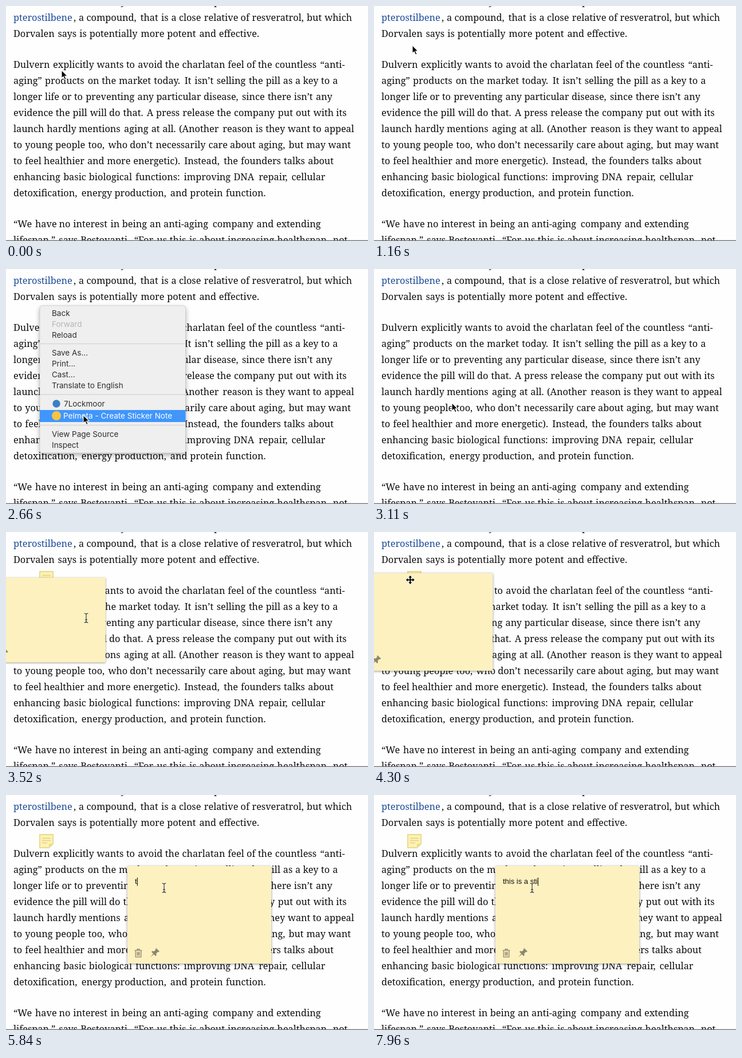
An HTML page that plays this animation: 632x410 px, repeating every 8 s.

```html
<!DOCTYPE html>
<html lang="en">
<head>
<meta charset="utf-8">
<title>Sticker note</title>
<style>
  html, body { margin: 0; width: 100%; height: 100%; overflow: hidden; background: #fefefe; }
  svg { display: block; width: 632px; height: 410px; }
  #page { font: 16.3px "Noto Serif", serif; fill: #0d0d0d; }
  #menu { font: 13.5px Inter, sans-serif; }
  #typed { font: 13px "Liberation Sans", Arial, sans-serif; white-space: pre; }
  .panel { filter: drop-shadow(0 4px 4px rgba(0, 0, 0, .3)); }
  .paper { filter: drop-shadow(0 1px 2px rgba(0, 0, 0, .42)); }
</style>
</head>
<body>
<svg viewBox="0 0 632 410" xmlns="http://www.w3.org/2000/svg">
  <rect width="632" height="410" fill="#fefefe"/>
  <g id="page"></g>
  <rect y="408.6" width="632" height="1.4" fill="#777"/>

  <g id="badge" opacity=".85">
    <path d="M59 69H82V85L75 92H59Z" fill="#fdf0a6" stroke="#e6d57c" stroke-width="2"/>
    <path d="M82 85H75V92Z" fill="#e6d57c"/>
    <path d="M63 75.5H78M63 79.5H78M63 83.5H72" stroke="#dccb74" stroke-width="1.6"/>
  </g>

  <g id="note">
    <rect class="paper" width="251" height="170" fill="#fef1c0"/>
    <g transform="translate(19 152)" fill="none" stroke="#8b866f" stroke-width="1.3">
      <path d="M-6.3 -4.8H6.3M-2 -5V-7H2V-5M-4.8 -4.5V6.6H4.8V-4.5M-2 -2.5V4.5M0 -2.5V4.5M2 -2.5V4.5"/>
    </g>
    <path transform="translate(47 152) rotate(45)" fill="#8b866f"
      d="M-4 -8.5H4V-6.3H2.6V-2L5.2 0V2H.8L0 9.5L-.8 2H-5.2V0L-2.6 -2V-6.3H-4Z"/>
    <text id="typed" x="13" y="31" fill="#111"></text>
    <rect id="caret" y="20" width="1" height="14.5" fill="#000"/>
  </g>

  <g id="menu">
    <rect class="panel" x="59" y="64" width="254.5" height="257" rx="4" fill="#efefef" stroke="#c4c4c4" stroke-width=".7"/>
    <rect id="bar" x="59" width="254.5" fill="#4096fb"/>
    <path d="M59 130.5H313.5M59 219H313.5M59 272.5H313.5" stroke="#d7d7d7" stroke-width="1.4"/>
    <circle cx="88" cy="235" r="6.7" fill="#3a80c3"/>
    <circle cx="88" cy="256" r="8" fill="#f4c445"/>
  </g>

  <path id="arrow" d="M0 0V14L3.2 11.1L5.6 16.4L8 15.4L5.7 10.2H10Z" fill="#000" stroke="#fff" stroke-width="1.1"/>
  <g id="beam" fill="none" stroke-linecap="round">
    <path d="M-3 -8Q0 -8 0 -6V6Q0 8 -3 8M3 -8Q0 -8 0 -6M0 6Q0 8 3 8M-1.8 3H1.8" stroke="#fff" stroke-opacity=".6" stroke-width="2.4"/>
    <path d="M-3 -8Q0 -8 0 -6V6Q0 8 -3 8M3 -8Q0 -8 0 -6M0 6Q0 8 3 8M-1.8 3H1.8" stroke="#222" stroke-width="1.1"/>
  </g>
  <path id="cross" fill="#000" stroke="#fff" stroke-width="1.2" paint-order="stroke"
    d="M0 -7.5L3 -4H1V-1H4V-3L7.5 0L4 3V1H1V4H3L0 7.5L-3 4H-1V1H-4V3L-7.5 0L-4 -3V-1H-1V-4H-3Z"/>
</svg>
<script>
const LOOP = 8000;
const $ = id => document.getElementById(id);

function add(parent, tag, attrs, text) {
  const node = document.createElementNS("http://www.w3.org/2000/svg", tag);
  for (const key in attrs) node.setAttribute(key, attrs[key]);
  if (text) node.textContent = text;
  return parent.appendChild(node);
}

// Page layout: words start where an 18px book face would put them.
const advance = {};
const setAdvance = (chars, widths) => [...chars].forEach((c, i) => advance[c] = widths[i] * .018);
setAdvance("abcdefghijklmnopqrstuvwxyz", [504, 560, 454, 575, 484, 325, 510, 582, 293, 291, 535, 287,
  880, 591, 539, 571, 560, 410, 432, 346, 576, 497, 738, 502, 493, 443]);
setAdvance(" ,.’“”-:()ABDFINW", [241, 270, 270, 226, 411, 411, 374, 313, 375, 375,
  671, 654, 750, 600, 390, 767, 977]);

function line(y, text, x = 13, fill = "inherit") {
  const row = add($("page"), "text", { y, style: "fill:" + fill });
  for (const word of text.split(/(?<= )/)) {
    add(row, "tspan", { x: x.toFixed(2) }, word);
    for (const c of word) x += advance[c];
  }
  return x;
}

line(-2, "y", 200);
line(-2, "p", 363);
const linkEnd = line(26, "pterostilbene", 13, "#1d4a98");
line(26, ", a compound, that is a close relative of resveratrol, but which", linkEnd);
line(54, "Dorvalen says is potentially more potent and effective.");
[
  "Dulvern explicitly wants to avoid the charlatan feel of the countless “anti-",
  "aging” products on the market today. It isn’t selling the pill as a key to a",
  "longer life or to preventing any particular disease, since there isn’t any",
  "evidence the pill will do that. A press release the company put out with its",
  "launch hardly mentions aging at all. (Another reason is they want to appeal",
  "to young people too, who don’t necessarily care about aging, but may want",
  "to feel healthier and more energetic). Instead, the founders talks about",
  "enhancing basic biological functions: improving DNA repair, cellular",
  "detoxification, energy production, and protein function."
].forEach((text, i) => line(108 + 28 * i, text));
line(386, "“We have no interest in being an anti-aging company and extending");
line(414, "lifespan,” says Bestovanti. “For us this is about increasing healthspan, not");

// Context menu: label, middle, row height, text start
const items = [
  ["Back", 77], ["Forward", 96], ["Reload", 115],
  ["Save As...", 146], ["Print...", 165], ["Cast...", 184], ["Translate to English", 203],
  ["7Lockmoor", 235, 21, 101], ["Pelmota - Create Sticker Note", 256, 21, 100],
  ["View Page Source", 288], ["Inspect", 307]
].map(([label, mid, h = 19, x = 80]) =>
  ({ mid, h, off: label === "Forward", node: add($("menu"), "text", { x, y: mid + 4.8 }, label) }));
const STICKER = items[8];

// Motion
const ease = {
  both: k => k * k * (3 - 2 * k),
  in: k => k * k,
  out: k => 1 - (1 - k) * (1 - k)
};
const clamp = k => Math.min(1, Math.max(0, k));

function follow(track, t) {
  let [t0, x0, y0] = track[0];
  for (const [t1, x1, y1, kind = "both"] of track) {
    if (t < t1) {
      const k = ease[kind](clamp((t - t0) / (t1 - t0)));
      return [x0 + (x1 - x0) * k, y0 + (y1 - y0) * k];
    }
    [t0, x0, y0] = [t1, x1, y1];
  }
  return [x0, y0];
}

const pointerTrack = [
  [420, 97, 112], [1220, 66.5, 68], [1310, 66.5, 68], [1680, 61, 80],
  [1950, 61, 80], [2040, 69, 101, "in"], [2660, 135, 255, "out"],
  [2960, 135, 255], [3480, 140, 150], [3640, 140, 150], [4150, 46, 80],
  [4270, 46, 80], [4470, 313, 135], [4580, 315, 135],
  [4700, 315, 135], [5030, 276, 162]
];
const noteTrack = [[4270, -61, 68.5], [4470, 206, 123.5], [4580, 212, 124]];
const MENU_ON = 1310, PICK = 2840, MENU_FADE = 2980, MENU_OFF = 3100;
const NOTE_ON = 3380, NOTE_FULL = 3600, FOCUS = 5030;

// Keystrokes; "<" deletes one character
const keys = "this is a stic<<i";
const keyTimes = [5840, 5920, 5990, 6140, 6230, 6380, 6470, 6560, 6710, 6760,
  6940, 7090, 7240, 7330, 7630, 7750, 7960];

function typing(t) {
  let text = "", last = FOCUS;
  keyTimes.forEach((time, i) => {
    if (t < time) return;
    text = keys[i] === "<" ? text.slice(0, -1) : text + keys[i];
    last = time;
  });
  return { text, caret: t >= FOCUS && (t - last) % 1000 < 510 };
}

function hovered(t) {
  if (t >= PICK) return t > PICK + 60 ? STICKER : null;
  const y = follow(pointerTrack, t - 70)[1];
  return items.find(it => !it.off && y >= it.mid - it.h / 2 + .5 && y < it.mid + it.h / 2 + .5);
}

const show = (node, on) => node.setAttribute("visibility", on ? "visible" : "hidden");
const place = (node, x, y, extra = "") => node.setAttribute("transform", `translate(${x} ${y})${extra}`);

function drawMenu(t) {
  const on = t >= MENU_ON && t < MENU_OFF;
  $("menu").style.display = on ? "" : "none";
  if (!on) return;
  $("menu").setAttribute("opacity", 1 - clamp((t - MENU_FADE) / (MENU_OFF - MENU_FADE)));
  const hit = hovered(t);
  show($("bar"), hit);
  if (hit) {
    $("bar").setAttribute("y", hit.mid - hit.h / 2 + .5);
    $("bar").setAttribute("height", hit.h);
  }
  for (const it of items) it.node.setAttribute("fill", it === hit ? "#fff" : it.off ? "#b5b5b5" : "#2d2d2d");
}

function drawNote(t, x, y) {
  const on = t >= NOTE_ON;
  $("note").style.display = $("badge").style.display = on ? "" : "none";
  if (!on) return;
  const scale = ease.out(clamp((t - NOTE_ON) / (NOTE_FULL - NOTE_ON)));
  place($("note"), x + 125.5, y + 85, ` scale(${scale}) translate(-125.5 -85)`);
  const { text, caret } = typing(t);
  $("typed").textContent = text;
  show($("caret"), caret);
  $("caret").setAttribute("x", 13.2 + (text ? $("typed").getComputedTextLength() : 0));
}

function drawPointer(t, noteY) {
  const [x, y] = follow(pointerTrack, t);
  const shape = t < NOTE_ON + 60 ? "arrow" : y - noteY < 20 ? "cross" : "beam";
  for (const id of ["arrow", "beam", "cross"]) show($(id), id === shape);
  place($(shape), x, y);
}

function draw(t) {
  const [x, y] = follow(noteTrack, t);
  drawMenu(t);
  drawNote(t, x, y);
  drawPointer(t, y);
}

function tick() {
  draw(performance.now() % LOOP);
  requestAnimationFrame(tick);
}
tick();
</script>
</body>
</html>
```
